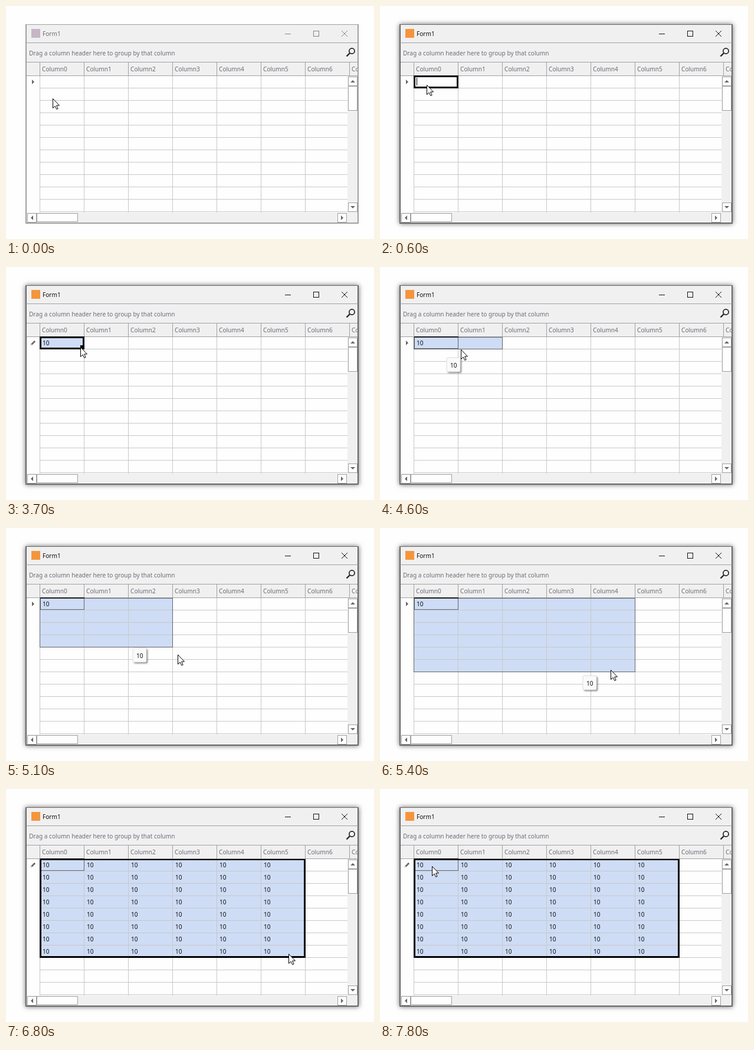
These frames come from a looping animation (624x396 px, 8000 ms). An HTML page with a canvas:

```html
<!DOCTYPE html>
<html lang="en">
<head>
<meta charset="utf-8">
<title>Grid fill handle</title>
<style>
html, body { margin: 0; width: 100%; height: 100%; overflow: hidden; background: #fefefe; }
canvas { display: block; width: 624px; height: 396px; }
</style>
</head>
<body>
<canvas></canvas>
<script>
const LOOP = 8000, STEP = 100;
const LEFT = 57, TOP = 119, COL = 75, ROW = 21;
const WHITE = '#fefefe', FACE = '#f0f0f0', EDGE = '#a0a0a0', LINE = '#c8c8c8', BLUE = '#cedcf5', LABEL = '#6c6b78';

const canvas = document.querySelector('canvas');
const scale = window.devicePixelRatio || 1;
canvas.width = 624 * scale;
canvas.height = 396 * scale;
const ctx = canvas.getContext('2d');
ctx.scale(scale, scale);

const easeIn = p => u => u ** p;
const easeOut = p => u => 1 - (1 - u) ** p;
const smooth = u => u * u * (3 - 2 * u);

// Pointer moves: start, end, x, y, easing, height of the upward arc
const moves = [
  [0, 300, 79, 134, smooth, 0],
  [2500, 3300, 125, 136, smooth, 35],
  [3600, 3700, 126, 136, smooth, 0],
  [3700, 3800, 129, 136, smooth, 0],
  [4200, 5100, 291, 215, easeIn(3.7), 0],
  [5100, 5900, 455, 258, easeOut(2), 0],
  [5900, 6400, 479, 280, easeIn(1.3), 0],
  [7200, 7800, 88, 131, smooth, 0]
];

function pointerAt(t) {
  let x = 79, y = 157;
  for (const [start, end, toX, toY, ease, arc] of moves) {
    if (t <= start) break;
    const u = Math.min(1, (t - start) / (end - start)), k = ease(u);
    x += (toX - x) * k;
    y += (toY - y) * k - arc * Math.sin(Math.PI * u);
  }
  return [Math.round(x), Math.round(y)];
}

function rect(x, y, w, h, color) {
  ctx.fillStyle = color;
  ctx.fillRect(x, y, w, h);
}

function frame(x, y, w, h, color, weight = 1) {
  ctx.strokeStyle = color;
  ctx.lineWidth = weight;
  ctx.strokeRect(x + weight / 2, y + weight / 2, w - weight, h - weight);
}

function dotted(x, y, w, h) {
  ctx.setLineDash([1, 1]);
  frame(x, y, w, h, '#000');
  ctx.setLineDash([]);
}

function text(string, x, y, color = '#111') {
  ctx.font = '10.1px "Noto Sans", sans-serif';
  ctx.fillStyle = color;
  ctx.fillText(string, x, y);
}

function polygon(points, color) {
  ctx.beginPath();
  points.forEach(([x, y]) => ctx.lineTo(x, y));
  ctx.closePath();
  ctx.fillStyle = color;
  ctx.fill();
}

function stroke(points, color, weight = 1) {
  ctx.beginPath();
  points.forEach(([x, y]) => ctx.lineTo(x, y));
  ctx.strokeStyle = color;
  ctx.lineWidth = weight;
  ctx.stroke();
}

function drawWindow(active) {
  const ink = active ? '#111' : '#858585';
  ctx.save();
  if (active) {
    ctx.shadowColor = 'rgba(0,0,0,.6)';
    ctx.shadowBlur = 8 * scale;
  }
  rect(33, 31, 565, 339, active ? '#686868' : EDGE);
  ctx.restore();
  rect(35, 32, 561, 336, FACE);

  rect(43, 39, 15, 15, active ? '#f4953c' : '#c6b6c6');
  text('Form1', 62, 51, active ? '#111' : '#6e6e6e');
  rect(473, 47, 10, 1, ink);
  frame(521, 42, 10, 10, ink);
  stroke([[569, 42], [579, 52]], ink);
  stroke([[579, 42], [569, 52]], ink);

  rect(34, 62, 563, 1, EDGE);
  text('Drag a column header here to group by that column', 39, 84, LABEL);
  ctx.beginPath();
  ctx.arc(586.5, 76.5, 4.6, 0, 7);
  ctx.strokeStyle = '#222';
  ctx.lineWidth = 1.7;
  ctx.stroke();
  stroke([[583, 80], [577.5, 85.5]], '#222', 2.4);
}

function drawHeader() {
  ctx.save();
  ctx.beginPath();
  ctx.rect(35, 95, 561, 24);
  ctx.clip();
  rect(35, 95, 561, 1, EDGE);
  rect(35, 118, 561, 1, EDGE);
  for (let c = 0; c < 8; c++) {
    rect(LEFT + c * COL, 96, 1, 22, EDGE);
    text('Column' + c, LEFT + 4 + c * COL, 111, LABEL);
  }
  ctx.restore();
}

function drawCells(cols, rows) {
  rect(35, TOP, 545, 232, WHITE);
  rect(LEFT + 1, TOP, cols * COL, rows * ROW, BLUE);
  for (let c = 0; c < 7; c++) rect(LEFT + c * COL, TOP, 1, 232, LINE);
  for (let r = 1; r <= 11; r++) rect(LEFT, TOP - 1 + r * ROW, 523, 1, LINE);
}

function arrowButton(x, y, dx, dy) {
  rect(x, y, 16, 16, WHITE);
  frame(x, y, 16, 16, EDGE);
  const cx = x + 8, cy = y + 8;
  polygon([
    [cx + 2 * dx, cy + 2 * dy],
    [cx - 2 * dx + 4 * dy, cy - 2 * dy + 4 * dx],
    [cx - 2 * dx - 4 * dy, cy - 2 * dy - 4 * dx]
  ], '#666');
}

function drawScrollbars() {
  rect(579, TOP, 17, 249, FACE);
  rect(35, 351, 561, 17, FACE);
  arrowButton(580, 120, 0, -1);
  arrowButton(580, 334, 0, 1);
  arrowButton(36, 352, -1, 0);
  arrowButton(562, 352, 1, 0);
  for (const [x, y, w, h] of [[580, 136, 16, 42], [52, 352, 70, 15]]) {
    rect(x, y, w, h, WHITE);
    frame(x, y, w, h, EDGE);
  }
}

function drawRowMark(editing) {
  if (editing) {
    stroke([[43.5, 131.5], [49, 126]], '#555', 2.6);
    stroke([[44.5, 130.5], [48, 127]], '#aaa', 0.8);
    rect(42, 132, 1, 1, '#555');
  } else {
    polygon([[44, 125], [48, 129], [44, 133]], '#666');
  }
}

function drawSingleCell(t) {
  const editing = t >= 600 && t < 2000;
  if (editing) rect(LEFT + 2, TOP + 1, 72, 18, WHITE);
  frame(LEFT, TOP - 1, 76, 22, '#000', 3);
  if (!editing) rect(126, 133, 5, 5, '#000');
  const value = t < 1400 ? '' : t < 1500 ? '1' : '10';
  text(value, 62, 133);
  if (editing && (t < 1200 || t >= 1400)) rect(62 + 6 * value.length, 122, 1, 13, '#000');
}

function drawRange(cols, rows, filled) {
  const w = cols * COL, h = rows * ROW;
  rect(LEFT + 1, TOP - 1, COL, 1, '#000');
  if (filled) {
    rect(LEFT, TOP, w + 1, 2, '#000');
    rect(LEFT, TOP, 3, h, '#000');
    rect(LEFT + w - 2, TOP, 3, h, '#000');
    rect(LEFT, TOP + h - 3, w + 1, 3, '#000');
  } else {
    dotted(LEFT, TOP, w + 1, h);
  }
  dotted(LEFT + 1, TOP, COL, 20);
  for (let r = 0; r < (filled ? rows : 1); r++)
    for (let c = 0; c < (filled ? cols : 1); c++)
      text('10', 62 + c * COL, 133 + r * ROW);
}

function drawTooltip(x, y) {
  ctx.save();
  ctx.shadowColor = 'rgba(0,0,0,.5)';
  ctx.shadowBlur = 3 * scale;
  ctx.shadowOffsetX = ctx.shadowOffsetY = 2 * scale;
  ctx.beginPath();
  ctx.roundRect(x, y, 23, 24, 2);
  ctx.fillStyle = '#fafafa';
  ctx.fill();
  ctx.restore();
  ctx.strokeStyle = '#dedee4';
  ctx.lineWidth = 1;
  ctx.stroke();
  text('10', x + 6, y + 17);
}

function drawPointer([x, y]) {
  ctx.save();
  ctx.translate(x + 0.5, y + 0.5);
  const shape = [[0, 0], [0, 16], [3.7, 12.6], [6.3, 18], [8.6, 17], [6.2, 11.5], [11, 11.5]];
  polygon(shape, '#fff');
  stroke([...shape, shape[0]], '#000');
  ctx.restore();
}

function draw(t) {
  const active = t >= 500, dragging = t >= 4100 && t < 6800, filled = t >= 6800;
  // The selection and its hint trail the pointer by one step
  const [trailX, trailY] = pointerAt(t - STEP);
  let cols = active ? 1 : 0, rows = cols;
  if (dragging) {
    cols = 1 + Math.floor((trailX - LEFT) / COL);
    rows = 1 + Math.floor((trailY - TOP) / ROW);
  } else if (filled) {
    cols = 6;
    rows = 8;
  }
  // The hint stays where the last drag step left it
  const [hintX, hintY] = pointerAt(Math.min(t, 6400) - STEP);

  rect(0, 0, 624, 396, WHITE);
  drawWindow(active);
  drawHeader();
  drawCells(cols, rows);
  drawScrollbars();
  drawRowMark(t >= 1400 && t < 4300 || filled);
  if (dragging || filled) drawRange(cols, rows, filled);
  else if (active) drawSingleCell(t);
  if (t >= 4300 && t < 6700) drawTooltip(hintX - 19, hintY + 17);
  drawPointer(pointerAt(t));
}

function tick() {
  const t = performance.now() % LOOP;
  draw(Math.floor(t / STEP) * STEP);
  requestAnimationFrame(tick);
}
tick();
</script>
</body>
</html>
```
